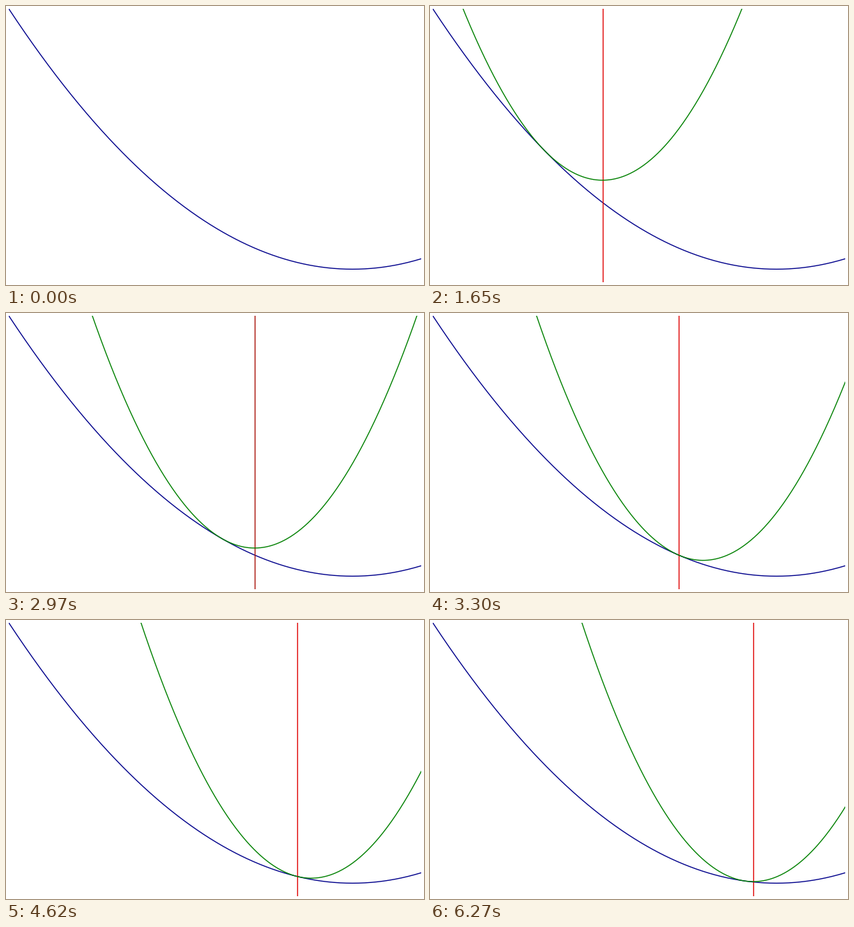
These frames come from a looping animation (600 by 400 pixels, 6600 ms). A matplotlib script:

```python
import numpy as np
import matplotlib.pyplot as plt
from matplotlib.animation import FuncAnimation

W, H, DPI, PAD = 600, 400, 100, 4
FRAMES, INTERVAL = 20, 330
START, SHRINK = -4.5, 0.75
RED, DARK_RED = "#e00000", "#a81008"
DARK_STEPS = (2, 9)

fig = plt.figure(figsize=(W / DPI, H / DPI), dpi=DPI, facecolor="white")
ax = fig.add_axes([PAD / W, PAD / H, 1 - 2 * PAD / W, 1 - 2 * PAD / H])
ax.set_xlim(-5, 1)
ax.set_ylim(-1.25, 25)
ax.axis("off")

xs = np.linspace(-5, 1, 601)
ax.plot(xs, xs**2, color="darkblue", lw=1)
marker = ax.axvline(START, color=RED, lw=1)
bound, = ax.plot([], [], color="green", lw=1)


def iterate(k):
    return START * SHRINK**k


def upper_bound(x0):
    """Parabola touching x**2 at x0 with four times its curvature."""
    return x0**2 + 2 * x0 * (xs - x0) + 4 * (xs - x0)**2


def update(n):
    # The marker and the bound take turns to advance.
    marker.set_visible(n >= 1)
    bound.set_visible(n >= 2)
    if n >= 1:
        x = iterate((n - 1) // 2)
        marker.set_xdata([x, x])
        marker.set_color(DARK_RED if n in DARK_STEPS else RED)
    if n >= 2:
        bound.set_data(xs, upper_bound(iterate((n - 2) // 2)))
    return marker, bound


anim = FuncAnimation(fig, update, frames=FRAMES, interval=INTERVAL,
                     init_func=lambda: update(0), repeat=True,
                     repeat_delay=0, blit=False)
plt.show()
```
